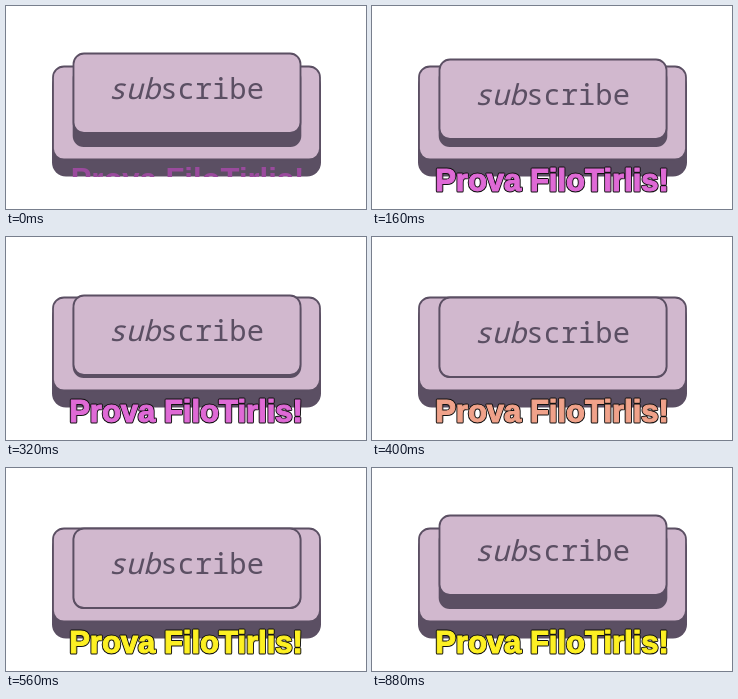
These frames come from a looping animation (360 by 203 pixels, 960 ms). An HTML page:

```html
<!DOCTYPE html>
<html lang="it">
<head>
<meta charset="utf-8">
<title>Subscribe</title>
<style>
  html, body { margin: 0; width: 100%; height: 100%; overflow: hidden; background: #fff; }
  svg { display: block; width: 100vw; height: 100vh; }
  .side { fill: #5b4f63; }
  .top { fill: #d1b8ce; stroke: #5b4f63; stroke-width: 1.8; }
  .label { font: 500 28.8px "Noto Sans Mono", "DejaVu Sans Mono", monospace; fill: #5b4f63; }
  .label .slant { font-style: italic; }
  .title { font: 700 31px "Liberation Sans", Arial, sans-serif; text-anchor: middle; }
  #ghost { fill: #9a4a9d; }
  #promo { color: #df6ad6; }
  .rim { fill: #111; stroke: #111; stroke-width: 3; stroke-linejoin: round; }
  .ink { fill: currentColor; stroke: currentColor; stroke-width: 1.1; }
</style>
</head>
<body>
<svg viewBox="0 0 360 203" preserveAspectRatio="none">
  <clipPath id="body"><rect x="46" y="60" width="269" height="110.5" rx="14"/></clipPath>

  <rect class="side" x="46" y="66" width="269" height="104.5" rx="14"/>
  <rect class="top" x="47" y="60.5" width="267" height="93" rx="11"/>

  <rect class="side" x="66.7" y="61" width="228.6" height="80" rx="11"/>
  <g id="key">
    <rect class="top" x="67.5" y="47.5" width="227" height="79.5" rx="10.5"/>
    <text class="label" x="102.4" y="93.4"><tspan class="slant">sub</tspan>scribe</text>
  </g>

  <g id="ghost" clip-path="url(#body)">
    <text class="title" x="181.5" y="183.5">Prova FiloTirlis!</text>
  </g>
  <g id="promo">
    <text class="title rim" x="180" y="184.8" aria-hidden="true">Prova FiloTirlis!</text>
    <text class="title ink" x="180" y="184.8">Prova FiloTirlis!</text>
  </g>
</svg>
<script>
  const LOOP = 960;

  // Each row is [start in ms, value]; values hold until the next row.
  function hold(id, prop, rows, wrap = v => v) {
    const frames = rows.map(([ms, v]) => ({
      offset: ms / LOOP, [prop]: wrap(v), easing: "step-end"
    }));
    frames.push({ ...frames[frames.length - 1], offset: 1 });
    document.getElementById(id).animate(frames, { duration: LOOP, iterations: Infinity });
  }

  hold("key", "transform",
    [[0, 0], [80, 3], [160, 6], [240, 9], [320, 11], [400, 13], [640, 0]],
    y => `translate(0px, ${y}px)`);

  hold("ghost", "opacity", [[0, 1], [80, 0]]);
  hold("promo", "opacity", [[0, 0], [80, 1]]);
  hold("promo", "color",
    [[0, "#df6ad6"], [400, "#f0a28a"], [480, "#f7cb55"], [560, "#fdf023"]]);
</script>
</body>
</html>
```
